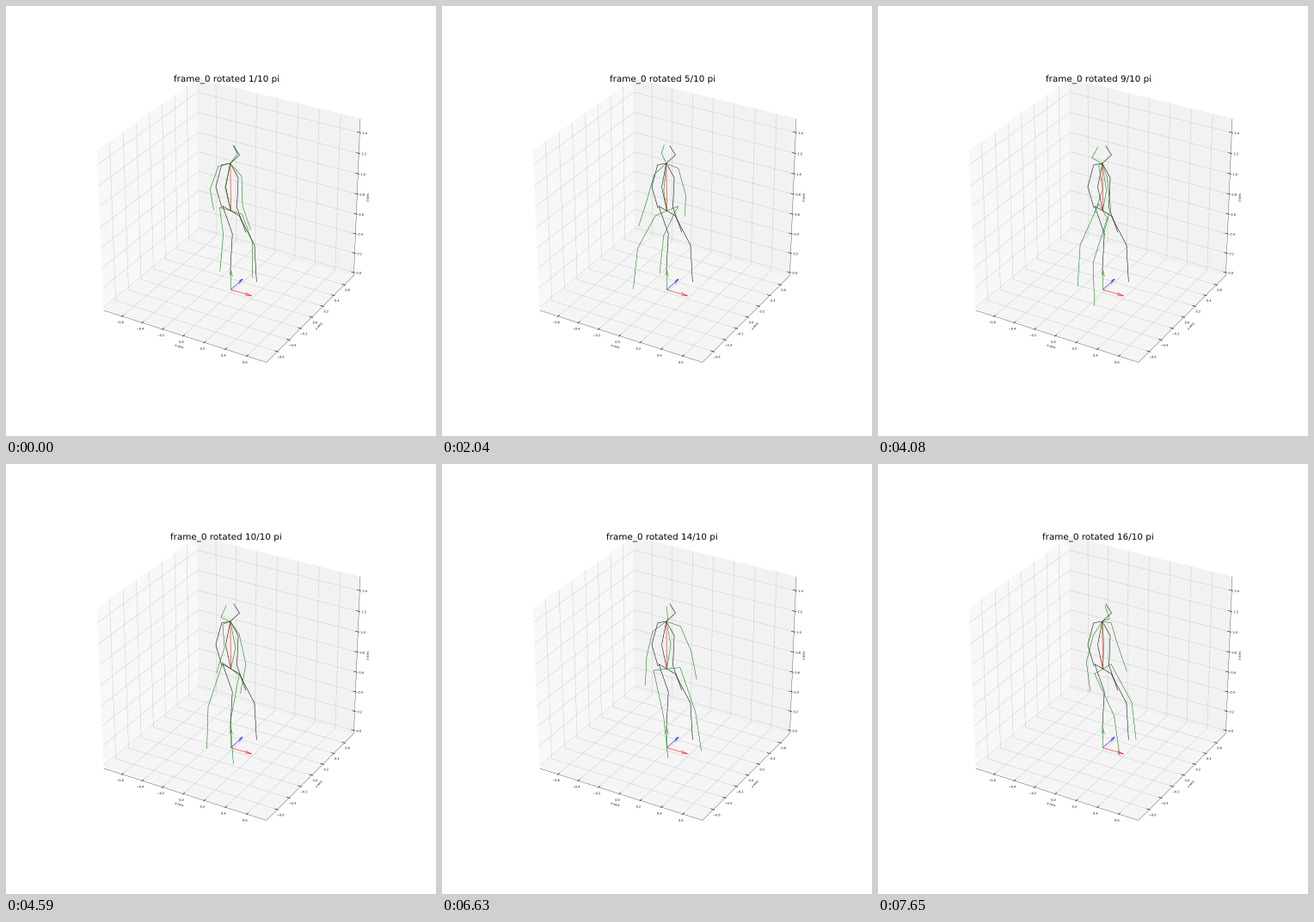
A matplotlib script that plays this animation: 500 by 500 pixels, repeating every 8000 ms.

```python
import numpy as np
import matplotlib.pyplot as plt
from matplotlib.animation import FuncAnimation
from matplotlib.collections import LineCollection
from matplotlib.patches import PathPatch, Polygon
from matplotlib.path import Path
from matplotlib.textpath import TextPath
from matplotlib.transforms import Affine2D

SIZE, DPI = 500, 25
LOOP, STEP, HOLD = 8000, 20, 510      # ms

plt.rcParams["text.hinting"] = "none"
fig = plt.figure(figsize=(SIZE / DPI, SIZE / DPI), dpi=DPI, facecolor="white")
ax = fig.add_axes([0, 0, 1, 1])
ax.set(xlim=(0, SIZE), ylim=(0, SIZE))
ax.axis("off")

# Perspective view, elevation 30, azimuth -60, of a unit box at the origin.
COS, SIN = np.cos(np.pi / 6), 0.5
ORIGIN = 62.5
SCALE = np.array([387.5, 377.5]) / 0.185


def view(right, away, up):
    depth = 10 + COS * away - SIN * up
    flat = np.array([right, SIN * away + COS * up]) / depth
    return ORIGIN + (flat + 0.095) * SCALE


def project(p):
    x, y, z = p
    return view(COS * x + SIN * y, COS * y - SIN * x, z)


def add_lines(segments, color, width):
    lines = LineCollection(segments, colors=color, linewidths=width)
    ax.add_collection(lines, autolim=False)
    return lines


# ---- box: panes, grid, axis lines, ticks and labels ----
H = 25 / 48                            # half edge of the padded box
BACK = np.array([-H, H, -H])
FONT = 10 * DPI / 72
TICK_PAD, NAME_PAD = 4 * 11.5 / 2203.2, 4 * 25 / 2203.2
XY_TICKS = np.arange(-3, 4) * 0.2
Z_TICKS = np.arange(8) * 0.2


def moved(p, axis, value):
    q = np.array(p, float)
    q[axis] = value
    return q


def flipped(p, axis):
    return moved(p, axis, -p[axis])


def pushed(p, axis, pad):
    """Move p away from the box centre in the two other directions."""
    step = np.sign(p) * pad
    step[axis] = 0
    return p + step


def text_path(s, pos, drop, angle=0):
    path = TextPath((0, 0), s, size=FONT)
    box = path.get_extents()
    place = (Affine2D().translate(-(box.x0 + box.x1) / 2, -drop * FONT)
             .rotate_deg(angle).translate(*pos))
    return path.transformed(place)


for axis, shade in enumerate((0.95, 0.90, 0.925)):
    i, j = (axis + 1) % 3, (axis + 2) % 3
    corners = [BACK, flipped(BACK, i), flipped(flipped(BACK, i), j), flipped(BACK, j)]
    ax.add_patch(Polygon([project(c) for c in corners], lw=1,
                         color=(shade,) * 3, alpha=0.5))

# axis: (start corner, direction of tick marks, tick values, normalised values)
AXES = [
    ((-H, -H, -H), 1, XY_TICKS, XY_TICKS / 1.5),
    ((H, H, -H), 0, XY_TICKS, XY_TICKS / 1.5),
    ((H, H, -H), 0, Z_TICKS, Z_TICKS / 1.5 - 0.5),
]
grid, edges, marks, texts = [], [], [], []
for axis, (start, tick_dir, values, spots) in enumerate(AXES):
    start = np.array(start)
    ends = project(start), project(flipped(start, axis))
    edges.append(ends)
    for value, spot in zip(values, spots):
        base = moved(BACK, axis, spot)
        grid.append([project(flipped(base, (axis + 1) % 3)), project(base),
                     project(flipped(base, (axis + 2) % 3))])
        p = moved(start, axis, spot)
        out = np.sign(p[tick_dir]) / 12
        marks.append([project(moved(p, tick_dir, p[tick_dir] + f * out))
                      for f in (-0.2, 0.1)])
        s = f"{abs(value):.1f}"
        if value < -0.01:
            s = "\N{MINUS SIGN}" + s
        texts.append(text_path(s, project(pushed(p, axis, TICK_PAD)), 0.76))
    dx, dy = ends[1] - ends[0]
    angle = np.degrees(np.arctan2(dy, dx)) % 180
    if angle > 90:
        angle -= 180
    middle = pushed(moved(start, axis, 0), axis, NAME_PAD)
    texts.append(text_path("xyz"[axis] + "-axis", project(middle), 0.276, angle))

add_lines(grid, "#b0b0b0", 0.8)
add_lines(edges, "black", 0.8)
add_lines(marks, "black", 1.5)
ax.add_patch(PathPatch(Path.make_compound_path(*texts), fc="black", lw=0))

# ---- skeleton: joints as (radius, angle, height) around the spine axis ----
JOINTS = {
    "hip": (0, 0, 0.031), "thorax": (0, 0, 0.3374),
    "spine": (0.031, 150, 0.1774),
    "neck": (0.0567, 27, 0.3767), "head": (0.022, 27, 0.4445),
    "r_hip": (0.0773, 126, 0.026), "l_hip": (0.0773, -54, 0.035),
    "r_knee": (0.1665, 88, -0.2194), "l_knee": (0.1317, 9, -0.209),
    "r_foot": (0.1966, 92.5, -0.4884), "l_foot": (0.1487, 18.5, -0.476),
    "r_shoulder": (0.0814, 126, 0.2924), "l_shoulder": (0.0786, -57, 0.2826),
    "r_elbow": (0.1414, 126, 0.1246), "l_elbow": (0.1106, -72, 0.1129),
    "r_wrist": (0.165, 108, -0.0405), "l_wrist": (0.1293, -51, -0.052),
}
CHAINS = [
    "hip r_hip r_knee r_foot", "hip l_hip l_knee l_foot",
    "hip spine thorax neck head",
    "thorax r_shoulder r_elbow r_wrist", "thorax l_shoulder l_elbow l_wrist",
]
LEAN = -0.0107


def joint(name, turn):
    r, deg, h = JOINTS[name]
    a = np.radians(deg) + turn
    return view(r * np.cos(a) + LEAN * (h - 0.03), r * np.sin(a), h)


def skeleton(turn=0.0):
    return [[joint(n, turn) for n in chain.split()] for chain in CHAINS]


add_lines(skeleton(), "black", 1.5)
turned = add_lines(skeleton(), "green", 1.5)
add_lines([[joint("hip", 0), joint("thorax", 0)]], "red", 1.5)


# ---- coordinate arrows on the floor ----
def arrow(direction, side, color):
    length = 0.2 / 1.5
    root = np.array([0, 0, -0.5])
    d, s = np.array(direction), np.array(side)
    tip = root + length * d
    c15, s15 = np.cos(np.pi / 12), np.sin(np.pi / 12)
    barbs = [tip - 0.3 * length * (c15 * d + k * s15 * s) for k in (1, -1)]
    add_lines([[project(tip), project(q)] for q in [root] + barbs], color, 1.5)


arrow((1, 0, 0), (0, 0, 1), "red")
arrow((0, 1, 0), (0, 0, 1), "blue")
arrow((0, 0, 1), (1, 0, 0), "green")

title = ax.text(256.25, 411.9, "", fontsize=30, ha="center", va="baseline")


def update(i):
    n = (i * STEP + STEP // 2) // HOLD + 1
    turned.set_segments(skeleton(n * np.pi / 10))
    title.set_text(f"frame_0 rotated {n}/10 pi")
    return turned, title


anim = FuncAnimation(fig, update, frames=LOOP // STEP, interval=STEP, repeat=True)
plt.show()
```
